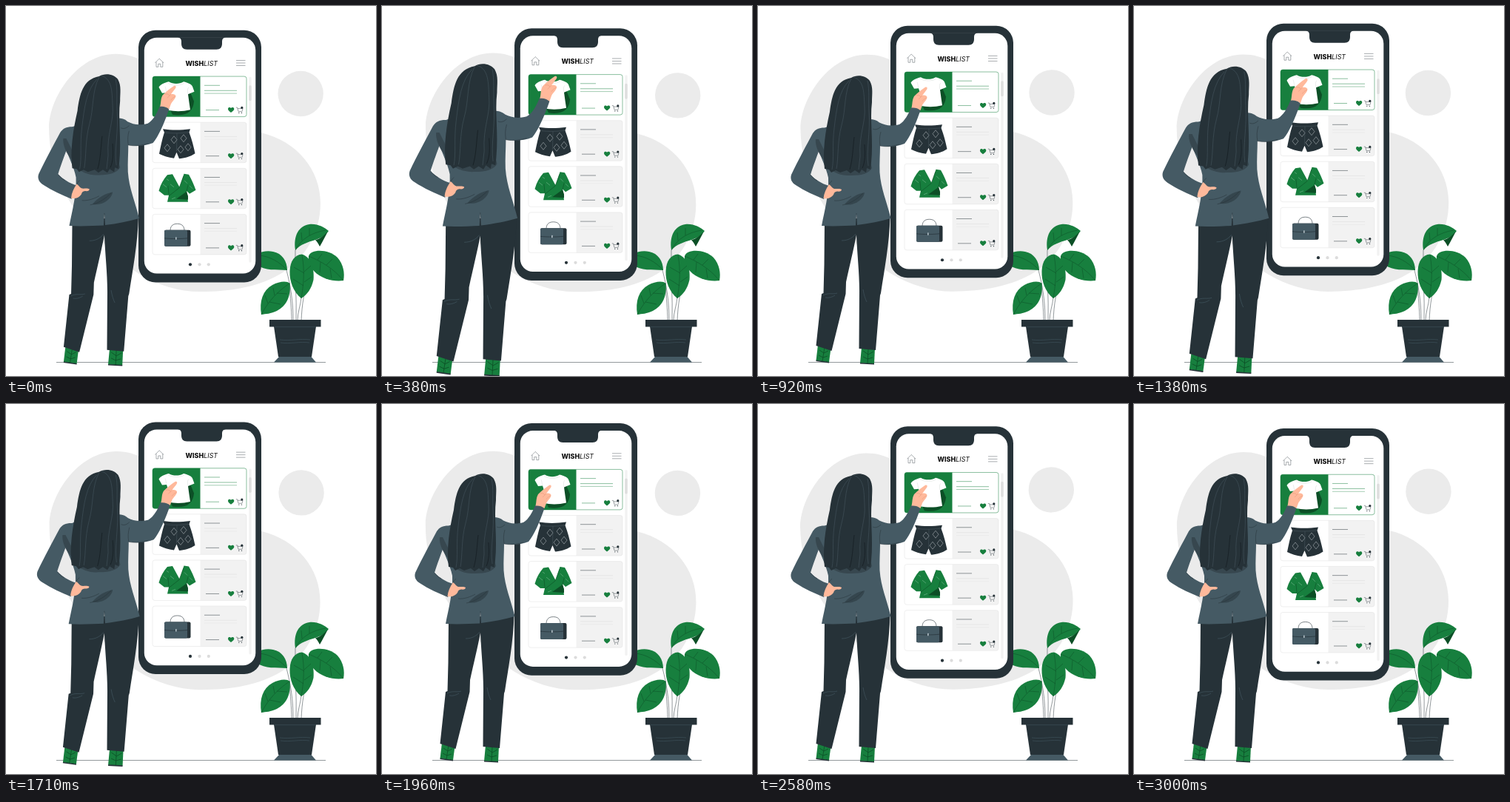
Recreate the animation shown at these times as an HTML page with a canvas. Size 500x500 px, loop 3040 ms.

```html
<!DOCTYPE html>
<html lang="en">
<head>
<meta charset="utf-8">
<title>Wishlist</title>
<style>
html, body { margin: 0; width: 100%; height: 100%; overflow: hidden; background: #fff; }
canvas { display: block; width: 500px; height: 500px; }
</style>
</head>
<body>
<canvas id="stage"></canvas>
<script>
const LOOP = 3040;
const LEAD = 30;
const DARK = '#263238', SLATE = '#455a64', GREEN = '#177f3e', DEEP = '#0c4f26';
const SKIN = '#ffb99b', PALE = '#ebebeb', WHITE = '#fff';

const canvas = document.getElementById('stage');
const ctx = canvas.getContext('2d');
const ratio = window.devicePixelRatio || 1;
canvas.width = canvas.height = 500 * ratio;

const cache = new Map();
function path(d) {
  if (!cache.has(d)) cache.set(d, new Path2D(d));
  return cache.get(d);
}
function fill(d, color) {
  ctx.fillStyle = color;
  ctx.fill(path(d));
}
function stroke(d, color, width = 0.5) {
  ctx.strokeStyle = color;
  ctx.lineWidth = width;
  ctx.stroke(path(d));
}
function dot(x, y, r, color) {
  ctx.fillStyle = color;
  ctx.beginPath();
  ctx.arc(x, y, r, 0, Math.PI * 2);
  ctx.fill();
}
function box(x, y, w, h, r, color) {
  ctx.fillStyle = color;
  ctx.beginPath();
  ctx.roundRect(x, y, w, h, r);
  ctx.fill();
}
function layer(draw) {
  ctx.save();
  draw();
  ctx.restore();
}

// Linear interpolation through [time, value] stops
function track(stops, p) {
  for (let i = 1; i < stops.length; i++) {
    const [t0, a] = stops[i - 1], [t1, b] = stops[i];
    if (p <= t1) return a + (b - a) * (p - t0) / (t1 - t0);
  }
  return stops[stops.length - 1][1];
}
const sway = [[0, 0], [0.25, 1], [0.75, -1], [1, 0]];
const floating = [[0, 0], [0.5, -10], [1, 0]];
const beat = [[0, 1], [0.1, 1.1], [0.3, 1], [0.4, 1], [0.5, 1.1], [0.6, 1], [1, 1]];

function backdrop() {
  fill('M58 165C58 124 97 65 148 65C205 65 215 120 255 145C285 163 315 164 345 171C392 182 425 220 425 266C425 306 405 340 374 360C342 380 302 386 262 386C234 386 205 377 180 362C148 342 130 318 105 290C80 262 58 215 58 165Z', PALE);
  dot(398, 118.3, 30.7, PALE);
}

function plant() {
  stroke('M379 357C385 380 388 400 388 425M383 374C384 395 386 410 386 425M399 394C398 405 394 414 394 425M413 364C402 382 400 405 399 425M391 330C390 360 393 395 392 425', DARK, 0.5);
  fill('M391 330C388 310 396 297 410 295C421 294 430 299 436 304C432 309 428 313 418 316C408 319 398 322 391 330Z', GREEN);
  fill('M418 316C425 315 431 309 435 304.500C431 312 428 318 424 325C422 321 420 318 418 316Z', DEEP);
  fill('M409 338C412 328 436 328 448 340C456 349 458 361 456 371C444 373 426 369 416 358C411 352 408 344 409 338Z', GREEN);
  fill('M380 357C380 345 373 334 361 332C353 330 346 332 338 335L339 350C350 358 365 356 380 357Z', GREEN);
  fill('M399 395C388 386 383 372 383.500 358C384 345 390 336 400 335.500C411 339 417 352 415.500 370C413 382 407 390 399 395Z', GREEN);
  fill('M345 417C342 399 347 384 360 377C369 372 380 371 383.500 375C385 391 380 405 366 412C358 416 351 416 345 417Z', GREEN);
  stroke('M391 330C399 314 414 306 432 303M400 317L399 306M410 310L410 300M409 338C426 345 443 355 456 371M421 343L427 335M433 350L441 342M425 346L424 360M438 355L440 368M342 337C356 338 370 346 380 357M400 337C404 357 402 378 399 395M403 359L412 351M403 373L413 366M403 361L389 353M402 378L388 369M345 417C355 398 368 385 383 375M354 402L350 391M363 391L361 381M356 400L371 403M366 388L380 389', DEEP, 0.5);
  fill('M362 433H419L413 474H368Z', DARK);
  fill('M356 424H425.500V433.500H356Z', DARK);
  fill('M369 474H412.500L419 481.500H362Z', SLATE);
  stroke('M363 433.700H419M370 451C385 453 397 449 411 451M371 455C384 457 398 453 410 455', SLATE, 0.5);
}

function tee() {
  fill('M247 112L254 129C253 142 245 150 225 147L222 141Z', DEEP);
  fill('M220 102.500C226 106 234 106 240 102.500C246 104 251 106 252 109L254.500 116L246 119.500C247 127 248 134 249 140.500C239 143 228 143 219 141C220 134 220 125 217 117.500L211 118L206.500 110C209 106 214 104 220 102.500Z', WHITE);
  stroke('M219 104.500C226 108 235 108 241 104.500M217 117C216 114 216 111 215 109M246 119C245 115 245 112 247 110', '#c9d2cd', 0.4);
}
function shorts() {
  fill('M212 166.500C225 168.500 237 168 249 166.500L247.500 171C251 180 253.500 190 255.500 199.500C249 204 241 206 234 206.500L230.500 198L227 206C219 205 213 203 207 200C209 190 211 180 214 171Z', DARK);
  for (const [x, y] of [[227, 181], [240, 179], [218, 192], [246, 191], [236, 194]])
    stroke(`M${x} ${y - 5}L${x + 4} ${y}L${x} ${y + 5}L${x - 4} ${y}Z`, '#c4cbce', 0.5);
  stroke('M214 171C225 173 238 172 247.500 171M231 172L230.500 197', '#56656c', 0.4);
}
function blouse() {
  fill('M218 228.500L225 227.500L234.500 245L240.500 227L247 228C251 235 254 242 256.500 249L248 254L244 250L246 265H218L220 256L214 256L206.500 250C209 241 213 234 218 228.500Z', GREEN);
  fill('M230 261L244 251L246 257V262Z', DEEP);
  stroke('M240 230L234 246L220 257M219 243L220 255M246 242L244 251', DEEP, 0.6);
  stroke('M212 241L217 245M222 241L227 245M241 236L245 240M248 243L252 247M224 261L229 259M217 234L220 236', '#8bc5a0', 0.5);
}
function bag() {
  stroke('M222 304C222 299 224 294.500 231.500 294.500C239 294.500 241 299 241 304', DARK, 0.6);
  box(214, 303, 35.5, 22, 2, DARK);
  box(214, 303, 31, 22, 2, SLATE);
  stroke('M214 314C222 315 237 315 245 314', DARK, 0.7);
  box(229, 312.5, 1.6, 3.5, 0.5, '#b0bec5');
}
const goods = [tee, shorts, blouse, bag];

function card(i) {
  const y = 95.3 + i * 62.1, first = i === 0;
  box(198, y, 127, 54.5, 3, WHITE);
  if (first) box(198, y, 64.5, 54.5, [3, 0, 0, 3], GREEN);
  else box(262.5, y, 62.5, 54.5, [0, 3, 3, 0], '#f2f2f2');
  ctx.strokeStyle = first ? GREEN : '#dedede';
  ctx.lineWidth = 0.5;
  ctx.beginPath();
  ctx.roundRect(198, y, 127, 54.5, 3);
  ctx.stroke();
  goods[i]();

  ctx.translate(0, y);
  stroke('M268 12.200H289', first ? GREEN : DARK, 0.5);
  stroke('M268 19.200H312', first ? GREEN : '#d8d8d8', 0.5);
  stroke('M268 23H312', first ? GREEN : '#dedede', 0.4);
  stroke('M270 45.500H288', first ? GREEN : DARK, 0.5);
  fill('M304 49C301 47 300 45.500 300 44C300 41.600 303 41.400 304 43C305 41.400 308.300 41.600 308.300 44C308.300 45.500 307 47 304 49Z', GREEN);
  stroke('M310.800 42H312.500L314 47.500H319L320 43.500H313', DARK, 0.45);
  dot(314.800, 49.300, 0.6, DARK);
  dot(318.500, 49.300, 0.6, DARK);
  dot(318.800, 42.300, 1.6, DARK);
}

function phone() {
  box(179, 33, 166, 340.600, 23, DARK);
  box(186.800, 43, 150.500, 318.800, 17, WHITE);
  fill('M232 42.500C235.500 43.100 237 45 237 48V51C237 56 239.500 59 244.500 59H284.500C289.500 59 292 56 292 51V48C292 45 293.500 43.100 297 42.500Z', DARK);

  stroke('M201.500 77L207.200 71.300L213 77M203 75.800V82.500H205.800V78.500H208.800V82.500H211.800V75.800', DARK, 0.4);
  stroke('M311 73.700H323.500M311 77.200H323.500M311 80.700H323.500', DARK, 0.4);
  ctx.fillStyle = '#111';
  ctx.textBaseline = 'alphabetic';
  ctx.textAlign = 'right';
  ctx.font = '800 9px Inter, sans-serif';
  ctx.fillText('WISH', 267.3, 81.2);
  ctx.textAlign = 'left';
  ctx.font = 'italic 400 8.800px Inter, sans-serif';
  ctx.fillText('LIST', 267.3, 81.2);

  for (let i = 0; i < 4; i++) layer(() => card(i));
  box(328.3, 96, 3.4, 251, 1.7, '#f2f2f2');
  box(328.3, 107.5, 3.4, 21, 1.7, '#dedede');
  dot(249, 349.500, 2.1, DARK);
  dot(261.500, 349.500, 2.1, '#dcdcdc');
  dot(273.800, 349.500, 2.1, '#dcdcdc');
}

function shoe(d, sole, laces) {
  fill(d, GREEN);
  stroke(sole, DARK, 1.6);
  stroke(laces, DEEP, 0.8);
}

function woman() {
  shoe('M81 458L98.500 462L96 481.500L78.500 479Z', 'M78.500 479.300L96 481.800', 'M90 461L87 480M83 465L89 469L95 466M82 472L88 475L94 473');
  shoe('M140 461L158 462L157 483.500L138 482.500Z', 'M138 482.800L157 483.800', 'M149 463L148 483M142 466L149 471L156 467M142 474L148 477L155 475');

  fill('M90 290L89.500 350L88.500 388L86 389L78.500 459L99.500 466L118.500 389L119 373C124 350 129 330 133 309C134 335 137 360 137 385L136.500 463L159 465L165 391L166 388C171 355 177.500 322 178.500 284Z', DARK);
  stroke('M88 391C95 387 101 390 107 388M91 394C96 395 101 393 104 391M142 383C143 390 145 396 147 400M113 317C122 317 128 313 132 308', SLATE, 0.6);

  // Hip arm, then torso with the pointing arm
  fill('M92 164.500C83 164 78 166 74 172C66 187 54 209 45 228C43 234 46 239 51 242C63 250 77 256 89 261L96 243C86 240 78 235 71 228C75 215 79 205 82.500 195Z', SLATE);
  fill('M93 163.500C85 166 79 173 80 190C84 203 92 217 95 232C96 255 90 276 86 297C102 298 119 297 132 296.500L133 281L134 296C150 294 166 291 179.500 287C174 264 166 247 164.500 225C164 212 165 200 165 189C176 191 188 190 198 186C205 178 213 160 219.500 141C215 137 211 136 207 137C203 147 198 156 191 160C179 163 171 161 164 157.500C160 154 156 153 151 153Z', SLATE);
  fill('M78 180C77 187 81 200 91 210L93 202L82 180Z', '#37474f');
  fill('M92 212C96 224 112 230 126 229C141 229 150 226 154 219L150 204H94Z', '#37474f');
  fill('M117 268C125 259 134 254 144 252C143 261 130 271 117 268Z', '#35464e');
  stroke('M133 296V280M165 189C164 182 164 177 166 170M165 189C175 191 184 189 191 187M155 166C159 168 163 166 166 163M71 228C73 231 77 235 80 236M100 236C97 239 96 241 96 243M103 263C111 264 121 260 126 257M114 269C126 267 135 260 142 253', DARK, 0.5);

  fill('M96 241C99 243 100 246 103 247C107 247.500 110 246 113 248C113 250 111 251 107 250.500C104 251 103 252 102 255C99 259 95 261 88.500 260C89 253 92 247 96 241Z', SKIN);
  fill('M207.500 137.500C209 132 208 127 211 122C215 118 221 113 226 109.800C228.500 109 229.500 111 228 113C226 116 224 118 222 121C225 120 228 121 228.500 123C228.500 127 224 130 222 134L219.500 141C216 138 212 137 207.500 137.500Z', SKIN);
  stroke('M214 121C217 120 219 121 220 123M222 121L217 126M228 124C225 125 223 127 222 129', '#df8d70', 0.4);

  fill('M126 97C134 92 146 94 151 101C156 110 154 119 154 130C151 154 156 182 153 211L152 221L147 219L146 225L140 221L137 226L131 222L125 226L120 222L111 225L105 222L99 225L96 221L90 220C87 196 91 169 97 143C100 121 104 101 126 97Z', DARK);
  stroke('M123 101C109 115 106 140 103 165C100 188 103 207 100 221M126 98C116 117 119 140 113 161C107 183 109 204 106 220M129 96C144 101 143 118 144 136C146 157 136 174 138 203L136 221M148 101C151 115 149 128 150 144C152 171 146 195 149 216', '#4a5b64', 0.5);
  stroke('M130 177C128 194 128 207 124 221M144 187C145 200 145 210 141 219', '#11191d', 0.6);
}

function render(t) {
  const p = ((t + LEAD) / LOOP) % 1;
  ctx.setTransform(ratio, 0, 0, ratio, 0, 0);
  ctx.fillStyle = WHITE;
  ctx.fillRect(0, 0, 500, 500);

  layer(() => {
    ctx.translate(241, 226);
    ctx.rotate(track(sway, p * 2 % 1) * Math.PI / 180);
    ctx.translate(-241, -226);
    backdrop();
  });
  stroke('M68 481.500H432', DARK, 0.5);
  plant();
  layer(() => {
    ctx.translate(0, track(floating, p));
    phone();
  });
  layer(() => {
    const s = track(beat, p);
    ctx.translate(136, 289.5);
    ctx.scale(s, s);
    ctx.translate(-136, -289.5);
    woman();
  });
}

const start = performance.now();
function tick(now) {
  render(Math.max(0, now - start));
  requestAnimationFrame(tick);
}
render(0);
requestAnimationFrame(tick);
</script>
</body>
</html>
```
